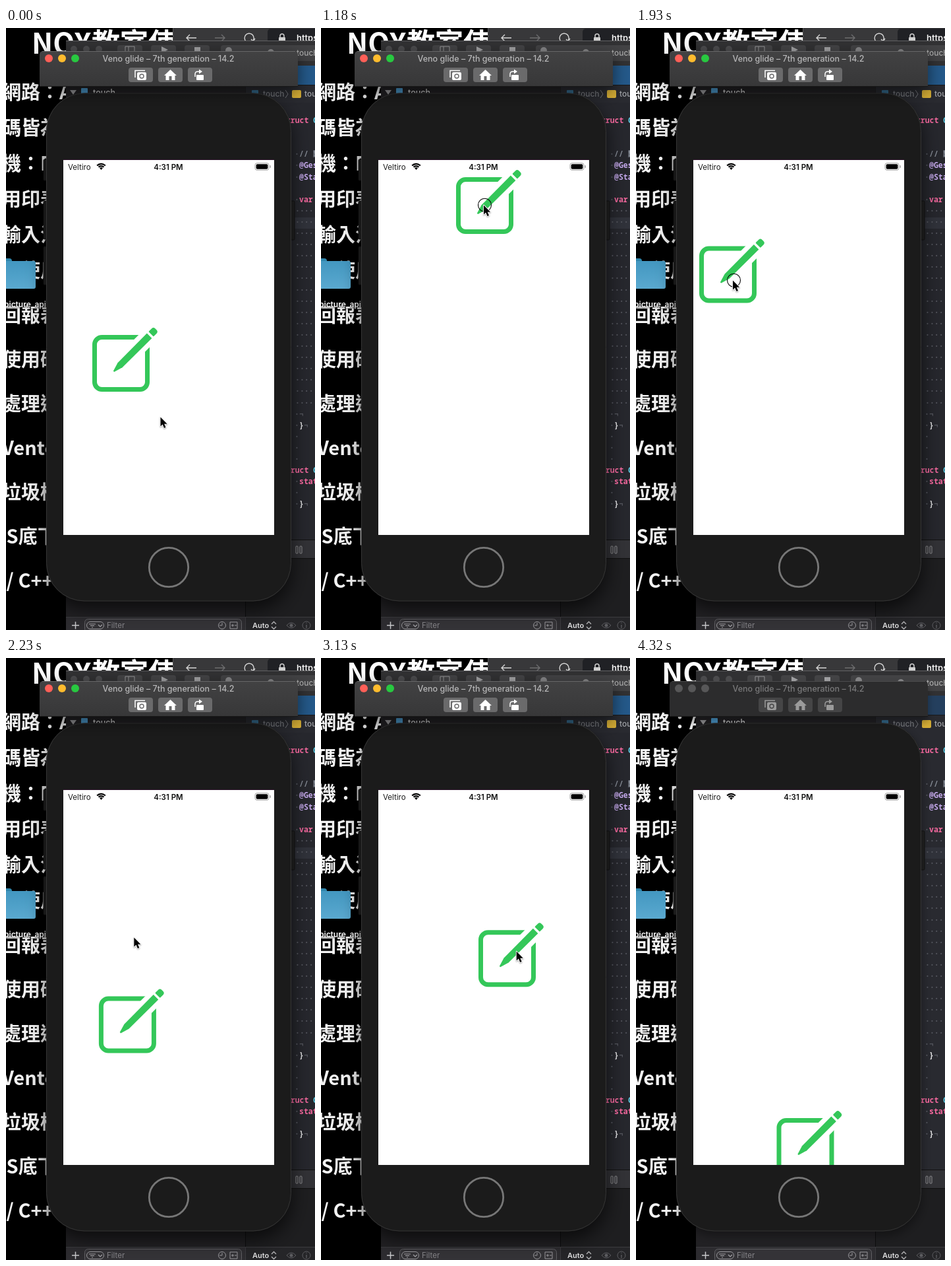
An HTML page with a canvas that plays this animation: 469 by 912 pixels, repeating every 4.42 s.

```html
<!DOCTYPE html>
<html lang="zh-Hant">
<head>
<meta charset="utf-8">
<title>Tap to move</title>
<style>
html, body { margin: 0; width: 100%; height: 100%; overflow: hidden; background: #000; }
canvas { display: block; width: 469px; height: 912px; }
</style>
</head>
<body>
<canvas id="stage" width="469" height="912"></canvas>
<script>
const ctx = document.getElementById('stage').getContext('2d');
const LOOP = 4420;
const LAST_STEP = 29;
const UI = 'Inter, "Noto Sans", sans-serif';
const CJK = '"Noto Sans CJK TC", "Noto Sans CJK", "Noto Sans CJK JP", sans-serif';
const MONO = '"Noto Sans Mono", "DejaVu Sans Mono", monospace';
const GREEN = '#34c759';

// Moves are [first step, last step, x, y], eased from wherever the part was.
const iconMoves = [
  [0, 0, 174.5, 508], [0, 2, 235, 585], [2, 3, 353, 321], [3, 5.2, 248.5, 269],
  [8, 13, 139.5, 373.5], [13, 15.4, 188, 570], [18, 22, 300, 434],
  [22, 25, 268, 714.5], [25, 27, 257, 740]
];
const cursorMoves = [
  [0, 0, 234, 589], [0, 4, 244, 262], [4, 8, 246.5, 268], [8, 13, 146.5, 382],
  [13, 18, 281, 498.5], [18, 22, 299, 434], [22, 25, 344.5, 833], [25, 27, 378, 880]
];

const clamp = u => Math.min(1, Math.max(0, u));
const ease = u => u * u * (3 - 2 * u);

function follow(moves, n) {
  let [, , x, y] = moves[0];
  for (const [from, to, tx, ty] of moves.slice(1)) {
    const k = ease(clamp((n - from) / (to - from)));
    x += (tx - x) * k;
    y += (ty - y) * k;
  }
  return [x, y];
}

// Three of the 150 ms steps are 10 ms short.
function stepAt(t) {
  const start = n => 150 * n - 10 * ((n > 3) + (n > 7) + (n > 23));
  let n = 0;
  while (n < LAST_STEP && start(n + 1) <= t) n++;
  return n;
}

function rect(x, y, w, h, fill) {
  ctx.fillStyle = fill;
  ctx.fillRect(x, y, w, h);
}

function round(x, y, w, h, r, fill, line, width = 1) {
  ctx.beginPath();
  ctx.roundRect(x, y, w, h, r);
  if (fill) { ctx.fillStyle = fill; ctx.fill(); }
  if (line) { ctx.strokeStyle = line; ctx.lineWidth = width; ctx.stroke(); }
}

function circle(x, y, r, fill, line, width) {
  round(x - r, y - r, 2 * r, 2 * r, r, fill, line, width);
}

function shape(d, fill) {
  ctx.fillStyle = fill;
  ctx.fill(new Path2D(d));
}

function stroke(d, color, width = 1) {
  ctx.strokeStyle = color;
  ctx.lineWidth = width;
  ctx.stroke(new Path2D(d));
}

function text(s, x, y, font, color, align = 'left') {
  ctx.font = font;
  ctx.fillStyle = color;
  ctx.textAlign = align;
  ctx.fillText(s, x, y);
}

function shadow(color = 'transparent', blur = 0, dy = 0) {
  ctx.shadowColor = color;
  ctx.shadowBlur = blur;
  ctx.shadowOffsetY = dy;
}

function vertical(y0, y1, a, b) {
  const g = ctx.createLinearGradient(0, y0, 0, y1);
  g.addColorStop(0, a);
  g.addColorStop(1, b);
  return g;
}

function drawDesktop() {
  rect(0, 0, 469, 912, '#000');
  text('NOX教室使用', 39, 39, `700 43px ${CJK}`, '#fff');
  const notes = ['網路：A', '碼皆為', '機：E', '用印表', '輸入法', '　使用', '回報表',
    '使用硬', '處理速', 'Vento', '垃圾桶', ' S底下', ' / C++'];
  notes.forEach((s, i) => {
    const y = i < 6 ? 97 + 54 * i : 435 + 67 * (i - 6);
    text(s, -6, y + 11, `700 29px ${CJK}`, '#f4f4f4');
  });

  round(-20, 349, 29, 20, 4, '#2f86ac');
  round(-20, 353, 65, 42, 3, vertical(353, 395, '#4397c0', '#5aa9d0'));
  shadow('#000', 3, 1);
  text('picture_api', -3, 423, `600 12px ${UI}`, '#fff');
  shadow();
}

function drawBrowser() {
  rect(253, 0, 216, 40, '#38383a');
  rect(253, 0, 1, 20, '#555');
  stroke('M289 15H274M279 10L274 15L279 20', '#d5d5d5', 1.4);
  stroke('M317 15H332M327 10L332 15L327 20', '#6c6c6e', 1.4);
  stroke('M364 20A7 7 0 1 1 375 19M372 17L375 20L378 16', '#d5d5d5', 1.4);
  round(397, 1, 90, 26, 5, '#202125');
  round(414, 14, 10, 8, 1, '#d0d0d0');
  stroke('M416 14V12A3 3 0 0 1 422 12V14', '#d0d0d0', 1.5);
  text('https', 441, 20, `600 13px ${UI}`, '#f0f0f0');
}

function drawCode() {
  const pink = '#f5699f', violet = '#c5a9ec', faint = '#54565e';
  const put = (y, x, s, color, weight = 600) =>
    text(s, x, y + 4, `${weight} 11.5px ${MONO}`, color);
  const keyword = (y, x, s) => put(y, x, s, pink, 700);
  const line = i => 140 + 17.1 * i;

  for (let i = 3; i < 35; i++) {
    if (i > 7 && i < 26) put(line(i), 439, '·····', faint);
    else if (i !== 6 && i !== 31) put(line(i), 438, '·', faint);
  }
  for (const i of [0, 31]) {
    keyword(line(i), 418, 'struct');
    put(line(i), 466, 'C', '#5dcde5');
  }
  put(line(3), 445, '// 點', '#858b95');
  put(line(4), 445, '@Gesture', violet);
  put(line(5), 445, '@State', violet);
  keyword(line(7), 445, 'var');
  keyword(line(32), 445, 'static');
  for (const i of [27, 34]) {
    put(line(i), 445, '}', '#e4e4e6');
    put(line(i), 452, '¬', faint);
  }
  put(line(26), 445, '¬', faint);
}

function drawEditor(active) {
  rect(91, 19, 378, 893, '#1e1e20');
  rect(91, 19, 378, 38, '#313133');
  rect(91, 19, 378, 1, '#626264');
  for (let i = 0; i < 3; i++) {
    circle(103 + 19 * i, 32, 5, '#4b4b4d');
    round(169 + 51 * i, 26, 38, 16, 4, '#434345');
  }
  stroke('M181 28H195V38H181ZM186 28V38', '#929294');
  shape('M236 28L246 33L236 38Z', '#a0a0a2');
  rect(286, 29, 9, 9, '#a0a0a2');
  round(326, 26, 150, 24, 4, '#424244');
  circle(338, 34, 5, '#858587');
  circle(402, 37, 5, '#858587');
  text('touch', 441, 42, `500 12px ${UI}`, '#aaa');

  // Navigator
  rect(91, 57, 272, 834, '#222124');
  shape('M97 94H107L102 101Z', '#9a9a9c');
  round(114, 91, 10, 13, 1, '#4c9cd0');
  text('touch', 132, 102, `500 12.5px ${UI}`, '#d8d8d8');

  // Editor pane
  rect(364, 57, 105, 29, active ? '#24598a' : '#243f5e');
  rect(364, 86, 105, 27, '#292a30');
  rect(364, 86, 105, 1, '#17181b');
  round(373, 94, 10, 13, 1, '#366d91');
  text('touch', 390, 104, `500 12px ${UI}`, '#77797e');
  stroke('M424 94L428 100L424 106', '#77797e');
  round(434, 94, 14, 12, 2, '#d6ae36');
  text('touch', 453, 104, `500 12px ${UI}`, '#a0a2a6');
  rect(364, 113, 105, 663, active ? '#26272d' : '#292a30');
  rect(364, 287, 105, 17, '#30323a');
  drawCode();
  rect(364, 775, 105, 29, '#111');
  rect(364, 776, 105, 27, '#323236');
  round(440, 785, 3, 11, 1, null, '#929295');
  round(446, 785, 3, 11, 1, null, '#929295');
  rect(363, 804, 1, 108, '#0d0d0e');

  // Bottom bars
  rect(91, 892, 378, 20, '#3c3b3f');
  rect(91, 893, 272, 19, '#2d2c30');
  rect(364, 893, 105, 19, '#252528');
  stroke('M100 905H111M105.5 899.5V910.5', '#c8c8ca', 1.5);
  round(119.5, 895.5, 238, 20, 5, '#343337', '#616064');
  round(122.5, 899.5, 26, 11, 5.5, null, '#99989c');
  stroke('M126 903H136M128 905.5H134M130 908H132M140 904L143 907L146 904', '#a5a4a8', 1.2);
  text('Filter', 153, 909, `400 11.5px ${UI}`, '#858488');
  circle(328, 905, 5.5, null, '#99989c');
  stroke('M328 901V905H324M340 900H351V910H340ZM342 905H346M347 905H350M344 903V907', '#99989c');
  text('Auto', 374, 909, `600 11px ${UI}`, '#dededf');
  stroke('M403 903L406.5 899.5L410 903M403 907L406.5 910.5L410 907', '#b5b5b7', 1.3);
  stroke('M426 905Q433 897 440 905Q433 913 426 905Z', '#5c5c60');
  circle(433, 905, 2.5, '#5c5c60');
  circle(456, 905, 6, null, '#5c5c60');
  stroke('M456 904V909M456 901V902', '#5c5c60', 1.3);
}

function drawToolbar(active) {
  const ink = active ? '#fff' : '#9b9b9b';
  const face = active ? '#6a6a6b' : '#454546';
  shadow(`rgba(0,0,0,${active ? 0.55 : 0.35})`, active ? 24 : 12, 8);
  round(51, 35, 392, 54, [5, 5, 0, 0],
    active ? vertical(35, 89, '#424243', '#373738') : '#2c2c2d');
  shadow();
  rect(55, 35, 384, 1, active ? '#676768' : '#4c4c4d');
  rect(51, 88, 392, 1, '#161616');
  ['#ff5f57', '#febc2e', '#28c840'].forEach((color, i) => {
    circle(65 + 20 * i, 46, 6, active ? color : '#575758');
    round(186 + 45 * i, 60, 37, 22, 4, face);
  });
  text('Veno glide – 7th generation – 14.2', 246.5, 51, `500 12.5px ${UI}`,
    active ? '#b6b6b7' : '#79797a', 'center');

  // Camera, home and rotate buttons
  stroke('M196 75V64.5H211', ink, 1.5);
  round(199, 67, 14, 12, 2, ink);
  circle(206, 73, 3, null, face, 1.4);
  shape('M240 72L249.5 63L259 72H256.5V79H251.5V73H247.5V79H242.5V72Z', ink);
  round(289, 71, 11, 8, 1, ink);
  stroke('M287 74V70Q287 66 291 66H294', ink, 1.5);
  shape('M293 62.5L298 66L293 69.5Z', ink);
}

function drawDevice(active) {
  const button = (x, y, h) => round(x, y, 6, h, 1.5, '#222', '#121212');
  button(57, 199, 32);
  button(57, 262, 58);
  button(57, 331, 58);
  button(432, 262, 59);
  shadow(`rgba(0,0,0,${active ? 0.65 : 0.4})`, active ? 28 : 16, active ? 12 : 6);
  round(61, 98.5, 372, 770, 58, '#1b1b1b');
  shadow();
  round(61.5, 99, 371, 769, 57.5, null, '#353535');
  circle(247, 817, 29.7, null, '#777', 2.8);
  rect(87, 199, 320, 1, '#2c1129');
  rect(87, 200, 320, 568, '#fff');
}

function drawStatus() {
  text('Veltiro', 94, 214.5, `400 11.5px ${UI}`, '#1b1b1b');
  for (const r of [8.7, 5.4]) {
    ctx.beginPath();
    ctx.arc(144.5, 214.5, r, -2.38, -0.76);
    ctx.strokeStyle = '#000';
    ctx.lineWidth = 2.2;
    ctx.stroke();
  }
  shape('M144.5 215L142 212L144.5 211L147 212Z', '#000');
  text('4:31 PM', 246.5, 214.5, `600 11.5px ${UI}`, '#111', 'center');
  round(378, 204.7, 21, 10.6, 3, null, '#a3a3a3');
  round(379.6, 206.2, 17.8, 7.6, 1.8, '#000');
  round(400.5, 208, 1.5, 4, 0.7, '#aaa');
}

function drawIcon(x, y) {
  ctx.save();
  ctx.beginPath();
  ctx.rect(87, 200, 320, 568);
  ctx.clip();
  ctx.translate(x, y);
  round(-40, -39.5, 80, 79, 11, null, GREEN, 7);
  ctx.translate(0.7, 0.7);
  ctx.rotate(-Math.PI / 4);
  rect(20, -12.5, 46, 25, '#fff');
  shape('M-16.5 -1L-3 -5L60 -5.3V5.3L-3 5L-16.5 1Z', GREEN);
  round(63.5, -5.3, 10.5, 10.6, [1, 4, 4, 1], GREEN);
  ctx.restore();
}

function drawCursor(x, y, pressed) {
  if (pressed) circle(x + 2, y + 0.3, 10, null, '#000', 1.1);
  const arrow = 'M.5 .5V14.5L3.7 11.5L6 17L8.5 16L6.2 10.7H10.6Z';
  ctx.save();
  ctx.translate(x, y);
  ctx.lineJoin = 'round';
  shadow('rgba(0,0,0,.35)', 2, 1);
  stroke(arrow, '#fff', 1.8);
  shadow();
  shape(arrow, '#000');
  ctx.restore();
}

function draw(t) {
  const n = stepAt(t);
  const active = n < LAST_STEP;
  drawDesktop();
  drawBrowser();
  drawEditor(active);
  drawDevice(active);
  drawToolbar(active);
  drawStatus();
  drawIcon(...follow(iconMoves, n));
  if (active) drawCursor(...follow(cursorMoves, n), n % 5 === 3);
}

const begin = performance.now();
function tick() {
  draw((performance.now() - begin) % LOOP);
  requestAnimationFrame(tick);
}
tick();
</script>
</body>
</html>
```
